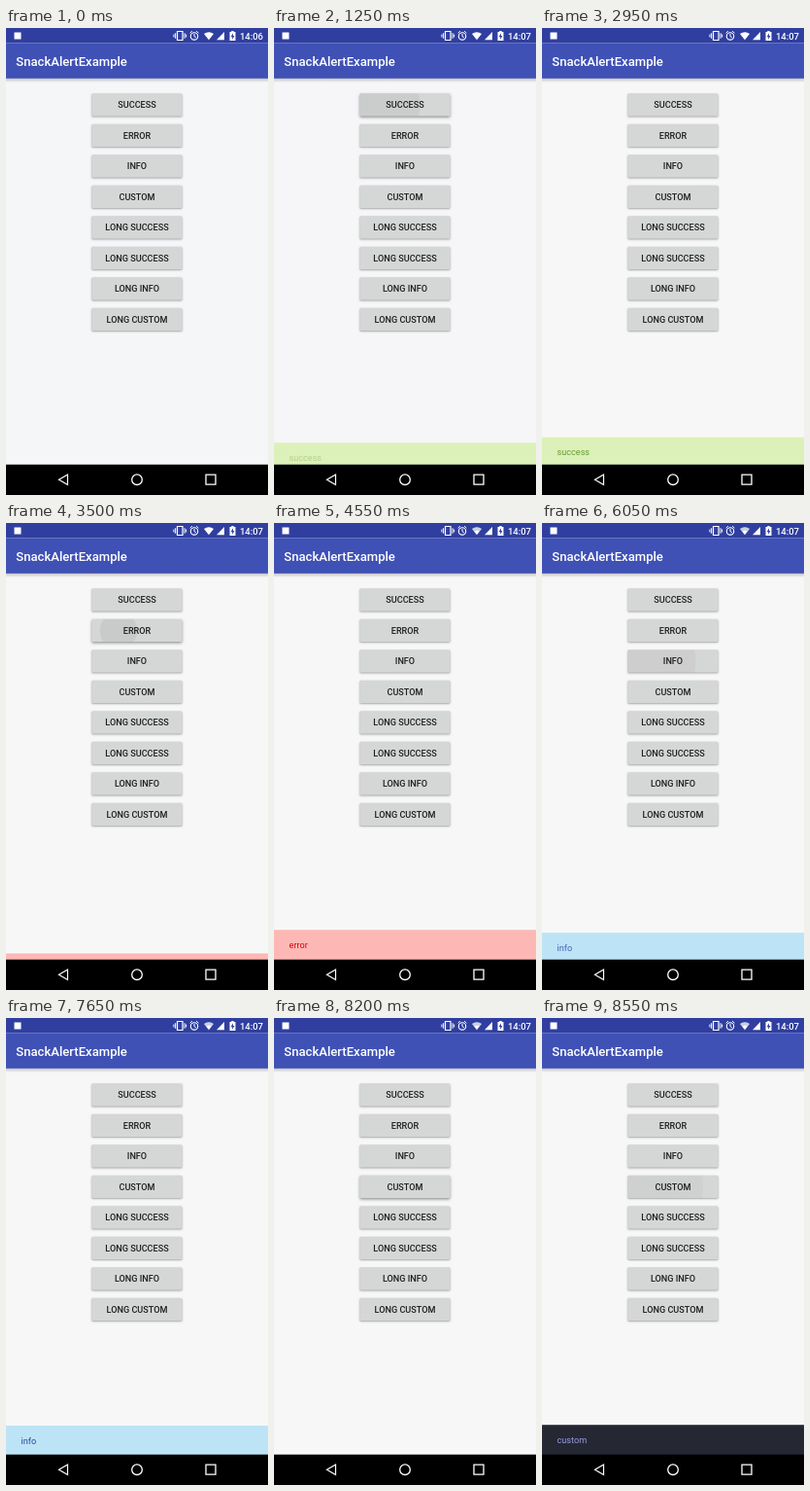
An HTML page with a canvas that plays this animation: 270x480 px, repeating every 9150 ms.

```html
<!DOCTYPE html>
<html lang="en">
<head>
<meta charset="utf-8">
<title>Snackbar demo</title>
<style>
  html, body { margin: 0; width: 100%; height: 100%; overflow: hidden; background: #000; }
  canvas { display: block; width: 270px; height: 480px; }
</style>
</head>
<body>
<canvas id="stage"></canvas>
<script>
const LOOP = 9150, STEP = 50, SLIDE = 250;
const BAR_TOP = 418.2, NAV_TOP = 449;
const LABELS = ['SUCCESS', 'ERROR', 'INFO', 'CUSTOM',
  'LONG SUCCESS', 'LONG SUCCESS', 'LONG INFO', 'LONG CUSTOM'];

// One entry per tapped button, in button order.
const ALERTS = [
  { text: 'success', bg: '#dcf1b9', ink: '#4f8a10', press: 1000, show: 1132, hide: 2910 },
  { text: 'error', bg: '#fdb8b5', ink: '#d8000c', press: 3350, show: 3440, hide: 5213 },
  { text: 'info', bg: '#bce4f6', ink: '#1f3f9b', press: 5750, show: 5890, hide: 7625 },
  { text: 'custom', bg: '#252833', ink: '#9c9ce8', press: 8200, show: 8300, hide: Infinity },
];

const canvas = document.getElementById('stage');
const ctx = canvas.getContext('2d');
const ratio = window.devicePixelRatio || 1;
canvas.width = 270 * ratio;
canvas.height = 480 * ratio;
ctx.scale(ratio, ratio);

const clamp = v => Math.min(1, Math.max(0, v));
const mix = (a, b, p) => a + (b - a) * p;

// cubic-bezier(.4, 0, .2, 1)
function ease(x) {
  x = clamp(x);
  let lo = 0, hi = 1;
  for (let i = 0; i < 20; i++) {
    const s = (lo + hi) / 2, r = 1 - s;
    if (1.2 * r * r * s + 0.6 * r * s * s + s * s * s < x) lo = s; else hi = s;
  }
  return 3 * (1 - lo) * lo * lo + lo ** 3;
}

function rect(x, y, w, h, color) {
  ctx.fillStyle = color;
  ctx.fillRect(x, y, w, h);
}

function text(str, x, y, size, color, weight = 500, align = 'left') {
  ctx.font = `${weight} ${size}px Roboto, sans-serif`;
  ctx.textAlign = align;
  ctx.fillStyle = color;
  ctx.fillText(str, x, y);
}

function shape(d, color = '#fff', line = 0) {
  const path = new Path2D(d);
  ctx.lineWidth = line;
  ctx.fillStyle = ctx.strokeStyle = color;
  if (line) ctx.stroke(path); else ctx.fill(path);
}

function ring(x, y, r, line) {
  ctx.beginPath();
  ctx.arc(x, y, r, 0, 7);
  ctx.lineWidth = line;
  ctx.strokeStyle = '#fff';
  ctx.stroke();
}

function statusBar(t) {
  rect(0, 0, 270, 15.4, '#303f9f');
  rect(8.5, 4.5, 7, 7, '#fff');
  shape('M176.5 3.5h5.5v9h-5.5z', '#fff', 1.2);
  shape('M174.6 5.2v5.6M184 5.2v5.6M172.9 6.5v3M185.6 6.5v3', '#fff', 1);
  ring(194, 8.4, 3.7, 1.1);
  shape('M194 6v2.6l1.8 1.2M189.6 5.2l2.3-2M198.4 5.2l-2.3-2', '#fff', 1);
  shape('M204 6q5-3.6 10 0l-5 6.2z');
  if (t >= 4550) shape('M204 6q5-3.6 10 0l-2.2 2.7q-2.8-1.8-5.6 0z', 'rgba(48,63,159,.25)');
  shape('M217 12.3l8-8.3v8.3z');
  shape('M232.3 3h2.4v1h1.8v9h-6v-9h1.8z');
  shape('M234 5.2l-2.4 4h1.6v2.8l2.2-4h-1.4z', '#303f9f');
  text(t < 800 ? '14:06' : '14:07', 265, 11.5, 9.5, '#fff', 500, 'right');
}

function appBar() {
  const shade = ctx.createLinearGradient(0, 51, 0, 56);
  shade.addColorStop(0, 'rgba(0,0,0,.25)');
  shade.addColorStop(1, 'rgba(0,0,0,0)');
  rect(0, 51, 270, 5, shade);
  rect(0, 15.4, 270, 36.4, '#3f51b5');
  text('SnackAlertExample', 10.3, 39, 13.1, '#fff');
}

function button(label, i, t) {
  const y = 67.3 + 31.5 * i;
  const age = ALERTS[i] ? t - ALERTS[i].press : -1;
  const pressed = age >= 0 && age < 300;
  ctx.save();
  ctx.beginPath();
  ctx.roundRect(88.3, y, 93.2, 23.3, 1.3);
  ctx.shadowColor = `rgba(0,0,0,${pressed ? 0.4 : 0.32})`;
  ctx.shadowBlur = (pressed ? 3 : 2) * ratio;
  ctx.shadowOffsetY = (pressed ? 1.3 : 0.9) * ratio;
  ctx.fillStyle = '#d5d6d6';
  ctx.fill();
  ctx.shadowColor = 'transparent';
  if (age > 0 && age < 500) {
    ctx.clip();
    ctx.beginPath();
    ctx.arc(116, y + 12, Math.max(0, 0.155 * age - 4), 0, 7);
    ctx.fillStyle = `rgba(0,0,0,${0.055 * clamp((500 - age) / 300)})`;
    ctx.fill();
  }
  ctx.restore();
  text(label, 135, y + 15, 9.1, '#1f1f1f', 500, 'center');
}

function snackbar(a, t) {
  if (t < a.show || t > a.hide + SLIDE) return;
  const leaving = t >= a.hide;
  const age = t - (leaving ? a.hide : a.show);
  const p = ease(age / SLIDE);
  const y = mix(BAR_TOP, NAV_TOP, leaving ? p : 1 - p);
  rect(0, y, 270, NAV_TOP - y, a.bg);
  ctx.globalAlpha = leaving ? 1 - ease(age / 180) : ease((age - 70) / 180);
  text(a.text, 15.6, y + 18.7, 9.1, a.ink, 400);
  ctx.globalAlpha = 1;
}

function navBar() {
  rect(0, NAV_TOP - 0.3, 270, 32, '#000');
  shape('M63.5 459v10.4l-9-5.2z', '#fff', 1.2);
  ring(135, 464.2, 5.3, 1.3);
  shape('M206 459.2h10v10h-10z', '#fff', 1.3);
}

function draw(t) {
  const p = clamp((t - 1000) / 950);
  rect(0, 0, 270, 480, `rgb(${mix(245, 247, p)},${mix(246, 247, p)},${mix(248, 247, p)})`);
  statusBar(t);
  appBar();
  LABELS.forEach((label, i) => button(label, i, t));
  ALERTS.forEach(a => snackbar(a, t));
  navBar();
}

const start = performance.now();
function frame() {
  const t = (performance.now() - start) % LOOP;
  // The last pose, at 8550 ms, is held until the loop restarts.
  draw(Math.min(8550, Math.floor(t / STEP) * STEP));
  requestAnimationFrame(frame);
}
frame();
</script>
</body>
</html>
```
